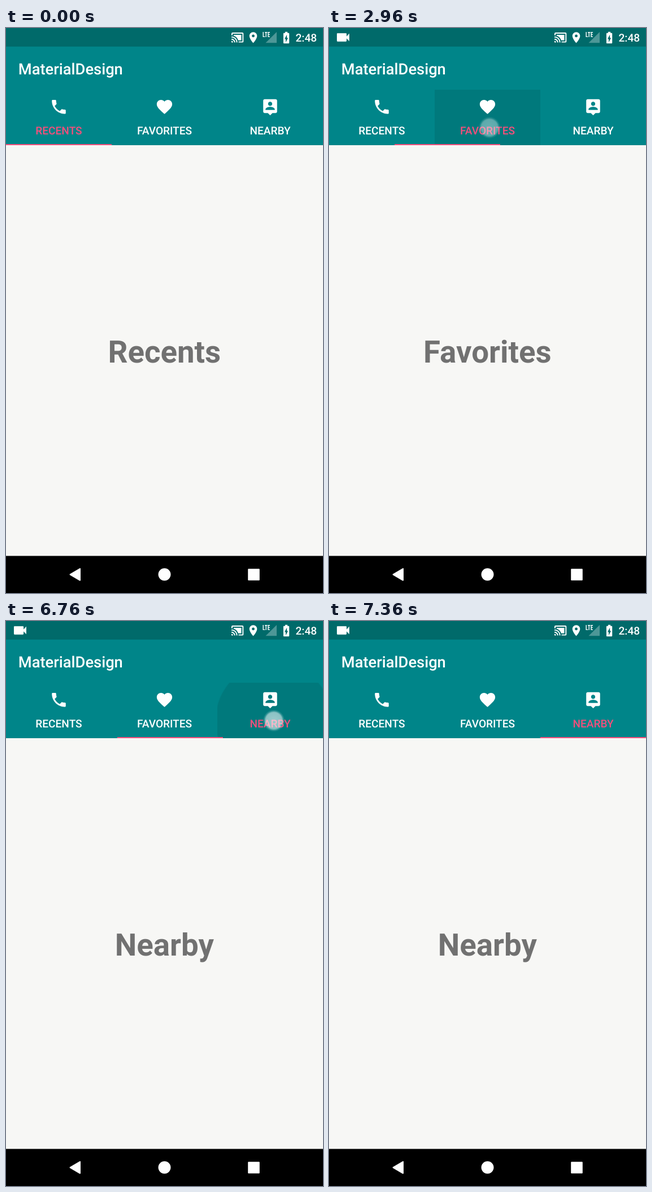
Animation, 561 px wide and 998 px high, one loop 7640 ms. Source, as an HTML page:

```html
<!DOCTYPE html>
<html lang="en">
<head>
<meta charset="utf-8">
<title>Tabs</title>
<style>
html, body { margin: 0; width: 100%; height: 100%; overflow: hidden; background: #f7f7f5; }
svg { display: block; width: 561px; height: 998px; }
text { font: 500 19.1px Roboto, sans-serif; fill: #fff; text-rendering: geometricPrecision; }
.title { font-size: 27.3px; }
.mid { text-anchor: middle; }
.label { fill: currentColor; color: #fff; visibility: visible !important; }
.page { font-size: 54.6px; font-weight: 700; fill: #717171; }

.first, .second, .third, .bar, .camera, .dot, .ripple {
  animation: 7640ms linear infinite;
}
/* Tab selection: tints the label and shows the page */
.first { animation-name: first; animation-timing-function: step-end; }
.second { animation-name: second; animation-timing-function: step-end; }
.third { animation-name: third; animation-timing-function: step-end; }
@keyframes first {
  0% { color: #f44f7c; visibility: visible; }
  37.173%, 100% { color: #fff; visibility: hidden; }
}
@keyframes second {
  0%, 87.958%, 100% { color: #fff; visibility: hidden; }
  37.173% { color: #f44f7c; visibility: visible; }
}
@keyframes third {
  0% { color: #fff; visibility: hidden; }
  87.958%, 100% { color: #f44f7c; visibility: visible; }
}

.bar { animation-name: bar; animation-timing-function: cubic-bezier(.4, 0, .2, 1); }
@keyframes bar {
  0%, 37.173% { transform: translateX(0); }
  41.099%, 87.958% { transform: translateX(187px); }
  91.885%, 100% { transform: translateX(374px); }
}

.camera { animation-name: camera; }
@keyframes camera {
  0%, 0.7% { opacity: 0; }
  3.665%, 100% { opacity: 1; }
}

/* Both taps share one timeline, shifted by a delay */
.dot, .ripple { opacity: 0; }
.dot { animation-name: dot; }
.ripple { animation-name: ripple; transform-box: fill-box; transform-origin: center; }
.tap1 { animation-delay: 2640ms; }
.tap2 { animation-delay: 6520ms; }
@keyframes dot {
  0%, 3.141% { opacity: 1; }
  6.283%, 100% { opacity: 0; }
}
@keyframes ripple {
  0%, 1.047% { opacity: 1; transform: scale(0); animation-timing-function: ease-out; }
  4.188%, 5.497% { opacity: 1; transform: scale(1); }
  10.9%, 100% { opacity: 0; transform: scale(1); }
}
</style>
</head>
<body>
<svg viewBox="0 0 561 998">
  <defs>
    <radialGradient id="glow">
      <stop offset="0" stop-color="#fff" stop-opacity=".62"/>
      <stop offset=".72" stop-color="#fff" stop-opacity=".56"/>
      <stop offset=".8" stop-color="#fff" stop-opacity=".42"/>
      <stop offset=".86" stop-color="#fff" stop-opacity=".2"/>
      <stop offset="1" stop-color="#fff" stop-opacity="0"/>
    </radialGradient>
    <clipPath id="tab2"><rect x="187" y="109" width="187" height="98"/></clipPath>
    <clipPath id="tab3"><rect x="374" y="109" width="187" height="98"/></clipPath>
  </defs>

  <rect width="561" height="998" fill="#f7f7f5"/>
  <rect width="561" height="207" fill="#008589"/>
  <rect width="561" height="32.8" fill="#006a6a"/>

  <g fill-opacity=".09">
    <g clip-path="url(#tab2)"><circle class="ripple tap1" cx="284" cy="176" r="122"/></g>
    <g clip-path="url(#tab3)"><circle class="ripple tap2" cx="474" cy="176" r="122"/></g>
  </g>

  <!-- Status bar -->
  <g fill="#fff" fill-rule="evenodd">
    <g class="camera">
      <path transform="translate(10.3 1.9) scale(1.22)" d="M17 10.5V7c0-.55-.45-1-1-1H4c-.55 0-1 .45-1 1v10c0 .55.45 1 1 1h12c.55 0 1-.45 1-1v-3.5l4 4v-11l-4 4z"/>
    </g>
    <path transform="translate(398 5.2) scale(.97)" d="M1 18v3h3c0-1.66-1.34-3-3-3zm0-4v2c2.76 0 5 2.24 5 5h2c0-3.87-3.13-7-7-7zm18-7H5v1.63c3.96 1.28 7.09 4.41 8.37 8.37H19V7zM1 10v2c4.97 0 9 4.03 9 9h2c0-6.08-4.93-11-11-11zm20-7H3c-1.1 0-2 .9-2 2v3h2V5h18v14h-7v2h7c1.1 0 2-.9 2-2V5c0-1.1-.9-2-2-2z"/>
    <path transform="translate(425.9 5.2) scale(.97)" d="M12 2C8.13 2 5 5.13 5 9c0 5.25 7 13 7 13s7-7.75 7-13c0-3.87-3.13-7-7-7zm0 9.5c-1.38 0-2.5-1.12-2.5-2.5s1.12-2.5 2.5-2.5 2.5 1.12 2.5 2.5-1.12 2.5-2.5 2.5z"/>
    <path fill-opacity=".3" d="M459.5 26.3 479 7v19.3z"/>
    <path fill="none" stroke="#fff" stroke-width="1.4" d="M455.2 7v8.4h3.2M458 7.7h4.4M460.2 7.7v8.4M467 7.7h-3v7.7h3M464 11.5h2.7"/>
    <path transform="translate(483.7 4.6) scale(1.03)" d="M15.67 4H14V2h-4v2H8.33C7.6 4 7 4.6 7 5.33v15.33C7 21.4 7.6 22 8.33 22h7.33c.74 0 1.34-.6 1.34-1.33V5.33C17 4.6 16.4 4 15.67 4zM11 20v-5.5H9L13 7v5.5h2L11 20z"/>
  </g>
  <text x="512.5" y="24">2:48</text>

  <text class="title" x="21.8" y="81.7">MaterialDesign</text>

  <!-- Tabs -->
  <g fill="#fff" fill-rule="evenodd">
    <path transform="translate(77.1 123) scale(1.364)" d="M6.62 10.79c1.44 2.83 3.76 5.14 6.59 6.59l2.2-2.2c.27-.27.67-.36 1.02-.24 1.12.37 2.33.57 3.57.57.55 0 1 .45 1 1V20c0 .55-.45 1-1 1-9.39 0-17-7.61-17-17 0-.55.45-1 1-1h3.5c.55 0 1 .45 1 1 0 1.25.2 2.45.57 3.57.11.35.03.74-.25 1.02l-2.2 2.2z"/>
    <path transform="translate(264.1 123) scale(1.364)" d="M12 21.35l-1.45-1.32C5.4 15.36 2 12.28 2 8.5 2 5.42 4.42 3 7.5 3c1.74 0 3.41.81 4.5 2.09C13.09 3.81 14.76 3 16.5 3 19.58 3 22 5.42 22 8.5c0 3.78-3.4 6.86-8.55 11.54L12 21.35z"/>
    <path transform="translate(451.1 123) scale(1.364)" d="M19 2H5c-1.11 0-2 .9-2 2v14c0 1.1.89 2 2 2h4l3 3 3-3h4c1.1 0 2-.9 2-2V4c0-1.1-.9-2-2-2zm-7 3.3c1.49 0 2.7 1.21 2.7 2.7 0 1.49-1.21 2.7-2.7 2.7-1.49 0-2.7-1.21-2.7-2.7 0-1.49 1.21-2.7 2.7-2.7zM18 16H6v-.9c0-2 4-3.1 6-3.1s6 1.1 6 3.1v.9z"/>
  </g>
  <text class="mid label first" x="93.5" y="188">RECENTS</text>
  <text class="mid label second" x="280.5" y="188">FAVORITES</text>
  <text class="mid label third" x="467.5" y="188">NEARBY</text>
  <rect class="bar" y="205" width="187" height="2" fill="#f44f7c"/>

  <!-- Pages -->
  <text class="mid page first" x="280.3" y="590.6">Recents</text>
  <text class="mid page second" x="280.3" y="590.6">Favorites</text>
  <text class="mid page third" x="280.3" y="590.6">Nearby</text>

  <!-- Navigation bar -->
  <rect y="932.5" width="561" height="65.5"/>
  <g fill="#fff" stroke="#fff" stroke-width="2" stroke-linejoin="round">
    <path d="M113.5 965.3 131 955v20.6z"/>
    <circle cx="280.5" cy="965.3" r="10"/>
    <path d="M429.2 956.2h18.6v18.6h-18.6z"/>
  </g>

  <circle class="dot tap1" cx="284" cy="176" r="19.5" fill="url(#glow)"/>
  <circle class="dot tap2" cx="474" cy="176" r="19.5" fill="url(#glow)"/>
</svg>
</body>
</html>
```
